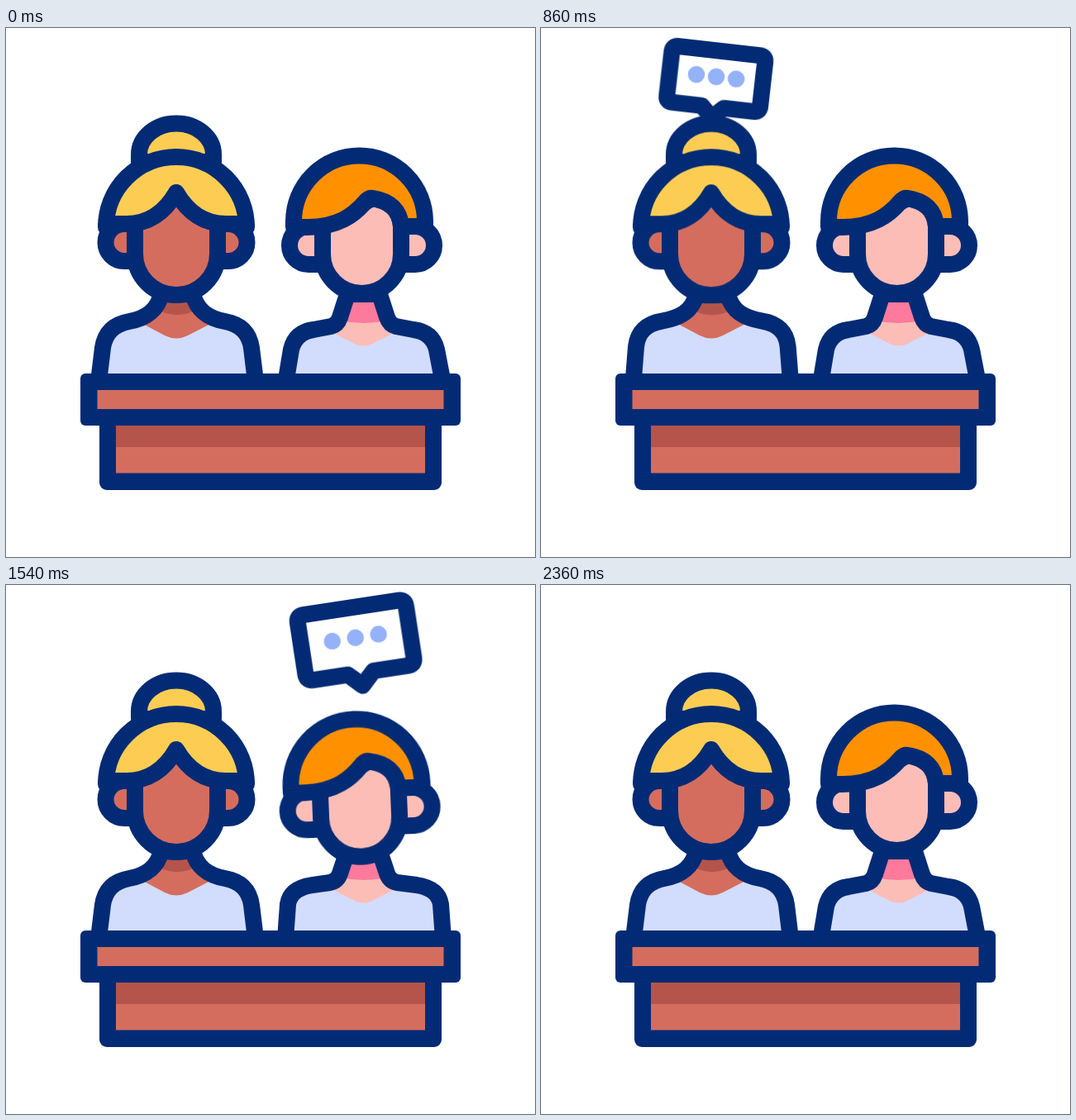
Write an HTML page without scripts that moves like this. It is 640 by 640 pixels and loops after 2.42 s.

```html
<!DOCTYPE html>
<html lang="en">
<head>
<meta charset="utf-8">
<title>Two speakers at a desk</title>
<style>
  html, body { margin: 0; width: 100%; height: 100%; overflow: hidden; background: #fff; }
  svg { display: block; width: 100%; height: 100%; }

  .line { fill: none; stroke: #032b75; stroke-width: 20; stroke-linejoin: round; }
  .navy { fill: #032b75; }
  .shirt { fill: #d2dcfd; }
  .tan { fill: #d46d5e; }
  .brown { fill: #b5544a; }
  .pale { fill: #fdbdb7; }
  .pink { fill: #fd7a9d; }
  .dots { stroke: #94b2f8; stroke-width: 20.5; stroke-linecap: round; }
  .fixed { vector-effect: non-scaling-stroke; }

  .left { --side: 1; --wait: 0s; }
  .right { --side: -1; --wait: .99s; }
  .nod { animation: nod 2.42s cubic-bezier(.37, 0, .63, 1) var(--wait) infinite; }
  .tilt { animation: tilt 2.42s cubic-bezier(.37, 0, .63, 1) var(--wait) infinite; }
  .left .tilt { transform-origin: 206px 320px; }
  .right .tilt { transform-origin: 430.5px 320px; }
  .left .bubble { animation: pop-left 2.42s infinite, fade-left 2.42s linear infinite; }
  .right .bubble { animation: pop-right 2.42s infinite, fade-right 2.42s linear infinite; }

  /* three nods, then rest */
  @keyframes nod {
    0%, 17.36%, 34.71%, 52.07%, 100% { transform: translateY(0); }
    8.68%, 26.03%, 43.39% { transform: translateY(11px); }
  }
  @keyframes tilt {
    0%, 52.07%, 100% { transform: rotate(0deg); }
    13.64% { transform: rotate(calc(var(--side) * -5.4deg)); }
    28.1% { transform: rotate(calc(var(--side) * 5.6deg)); }
    42.15% { transform: rotate(calc(var(--side) * -4.6deg)); }
  }
  @keyframes pop-left {
    0%, 6.61% { transform: rotate(-9deg) scale(0); animation-timing-function: cubic-bezier(.39, .575, .565, 1); }
    17.36% { transform: rotate(-9.5deg) scale(.97); animation-timing-function: ease-in-out; }
    27.27% { transform: rotate(5.5deg) scale(.893); animation-timing-function: ease-in-out; }
    44.63% { transform: rotate(7.6deg) scale(.88); animation-timing-function: linear; }
    53.72%, 100% { transform: rotate(7.6deg) scale(0); }
  }
  @keyframes fade-left {
    0%, 6.61%, 53.72%, 100% { opacity: 0; }
    15.5%, 44.63% { opacity: 1; }
  }
  @keyframes pop-right {
    0%, 48.76% { transform: rotate(-6deg) scale(0); animation-timing-function: cubic-bezier(.39, .575, .565, 1); }
    59.09% { transform: rotate(-8deg) scale(1.1); animation-timing-function: ease-in-out; }
    66.94% { transform: rotate(-9deg) scale(1); }
    85.95% { transform: rotate(-9deg) scale(1); animation-timing-function: linear; }
    96.69%, 100% { transform: rotate(-9deg) scale(0); }
  }
  @keyframes fade-right {
    0%, 48.76%, 96.69%, 100% { opacity: 0; }
    57.6%, 85.95% { opacity: 1; }
  }
</style>
</head>
<body>
<svg viewBox="0 0 640 640">
  <defs>
    <!-- the outline keeps its weight while the bubble grows -->
    <g id="bubble">
      <path class="line fixed" style="fill:#fff" d="M-56 -92H56Q64 -92 64 -84V-23Q64 -15 56 -15H15L0 0L-15 -15H-56Q-64 -15 -64 -23V-84Q-64 -92 -56 -92Z"/>
      <path class="dots fixed" d="M-27.3 -56.5h.01M0 -56.5h.01M27.3 -56.5h.01"/>
    </g>
    <path id="body-left" d="M112 428L117 387Q121 360 149 355C171 351 183 341 188 322H226C231 341 243 351 265 355Q293 360 297 387L302 428">
      <animate attributeName="d" dur="2.42s" repeatCount="indefinite" calcMode="spline"
        keyTimes="0;.062;.24;.43;1" keySplines="0 0 1 1;.37 0 .63 1;.37 0 .63 1;0 0 1 1"
        values="M112 428L117 387Q121 360 149 355C171 351 183 341 188 322H226C231 341 243 351 265 355Q293 360 297 387L302 428;
                M112 428L117 387Q121 360 149 355C171 351 183 341 188 322H226C231 341 243 351 265 355Q293 360 297 387L302 428;
                M111 428L111 382Q112 358 140 354C165 350 181 346 188 325H226C233 346 249 350 274 354Q302 358 302 382L302 428;
                M112 428L117 387Q121 360 149 355C171 351 183 341 188 322H226C231 341 243 351 265 355Q293 360 297 387L302 428;
                M112 428L117 387Q121 360 149 355C171 351 183 341 188 322H226C231 341 243 351 265 355Q293 360 297 387L302 428"/>
    </path>
    <path id="body-right" d="M338.5 428L345 389Q350 368 372 365L393 361Q401 359 404 350L413 322H452L461 350Q464 359 472 361L493 365Q516 368 521 389L528.5 428">
      <animate attributeName="d" dur="2.42s" repeatCount="indefinite" calcMode="spline"
        keyTimes="0;.471;.649;.839;1" keySplines="0 0 1 1;.37 0 .63 1;.37 0 .63 1;0 0 1 1"
        values="M338.5 428L345 389Q350 368 372 365L393 361Q401 359 404 350L413 322H452L461 350Q464 359 472 361L493 365Q516 368 521 389L528.5 428;
                M338.5 428L345 389Q350 368 372 365L393 361Q401 359 404 350L413 322H452L461 350Q464 359 472 361L493 365Q516 368 521 389L528.5 428;
                M338 428L341 386Q344 367 370 363L392 360Q401 358 404 349L413 322H452L461 349Q464 358 473 360L497 363Q523 367 526 386L529 428;
                M338.5 428L345 389Q350 368 372 365L393 361Q401 359 404 350L413 322H452L461 350Q464 359 472 361L493 365Q516 368 521 389L528.5 428;
                M338.5 428L345 389Q350 368 372 365L393 361Q401 359 404 350L413 322H452L461 350Q464 359 472 361L493 365Q516 368 521 389L528.5 428"/>
    </path>
  </defs>

  <g class="left">
    <use href="#body-left" class="shirt"/>
    <path class="tan" d="M160 355L192 372Q206 379 220 372L253 355L236 345L227 320H187L178 345Z"/>
    <path class="brown nod" d="M188 315H226V343Q207 351 188 343Z"/>
    <use href="#body-left" class="line"/>
    <g transform="translate(206.4 108.7)"><g class="bubble"><use href="#bubble"/></g></g>
    <g class="nod"><g class="tilt">
      <path class="line" style="fill:#d46d5e" d="M156 237H143A22.5 22.5 0 0 0 143 282H156M256 237H269A22.5 22.5 0 0 1 269 282H256"/>
      <path class="line" style="fill:#d46d5e" d="M156 234V273A50 50 0 0 0 256 273V234L206 199Z"/>
      <path class="line" style="fill:#fdcd53" d="M161 162V153A45 37.5 0 0 1 251 153V162Z"/>
      <path class="line" style="fill:#fdcd53" d="M121 241A85 85 0 0 1 291 241V237H266C238 237 219 221.5 206 199C193 221.5 174 237 146 237H121Z"/>
    </g></g>
  </g>

  <g class="right">
    <use href="#body-right" class="shirt"/>
    <path class="pale" d="M392 367L418 380Q432.5 389 447 380L473 367L460 350L452 320H413L405 350Z"/>
    <path class="pink" d="M413 320H452L460 354Q432.5 360 405 354Z"/>
    <use href="#body-right" class="line"/>
    <g transform="translate(431.5 121.7)"><g class="bubble"><use href="#bubble"/></g></g>
    <g class="nod"><g class="tilt">
      <path class="line" style="fill:#fdbdb7" d="M383 240H366A23 23 0 0 0 366 286H383M478 240H495A23 23 0 0 1 495 286H478"/>
      <path class="line" style="fill:#fdbdb7" d="M383 240V273.5A47.5 47.5 0 0 0 478 273.5V240Q476 211 443 206Z"/>
      <path class="line" style="fill:#ff9100" d="M348 241V234A79.5 79.5 0 0 1 507 234V240H478Q476 211 443 206Q439 205 434 211C421 226 402 241 365 241Z"/>
    </g></g>
  </g>

  <rect class="navy" x="113" y="460" width="414" height="99" rx="9"/>
  <rect class="tan" x="133" y="481" width="374" height="57.5"/>
  <rect class="brown" x="133" y="481" width="374" height="26"/>
  <rect class="navy" x="90" y="418" width="460" height="63" rx="6"/>
  <rect class="tan" x="110.5" y="438" width="419" height="23"/>
</svg>
</body>
</html>
```
